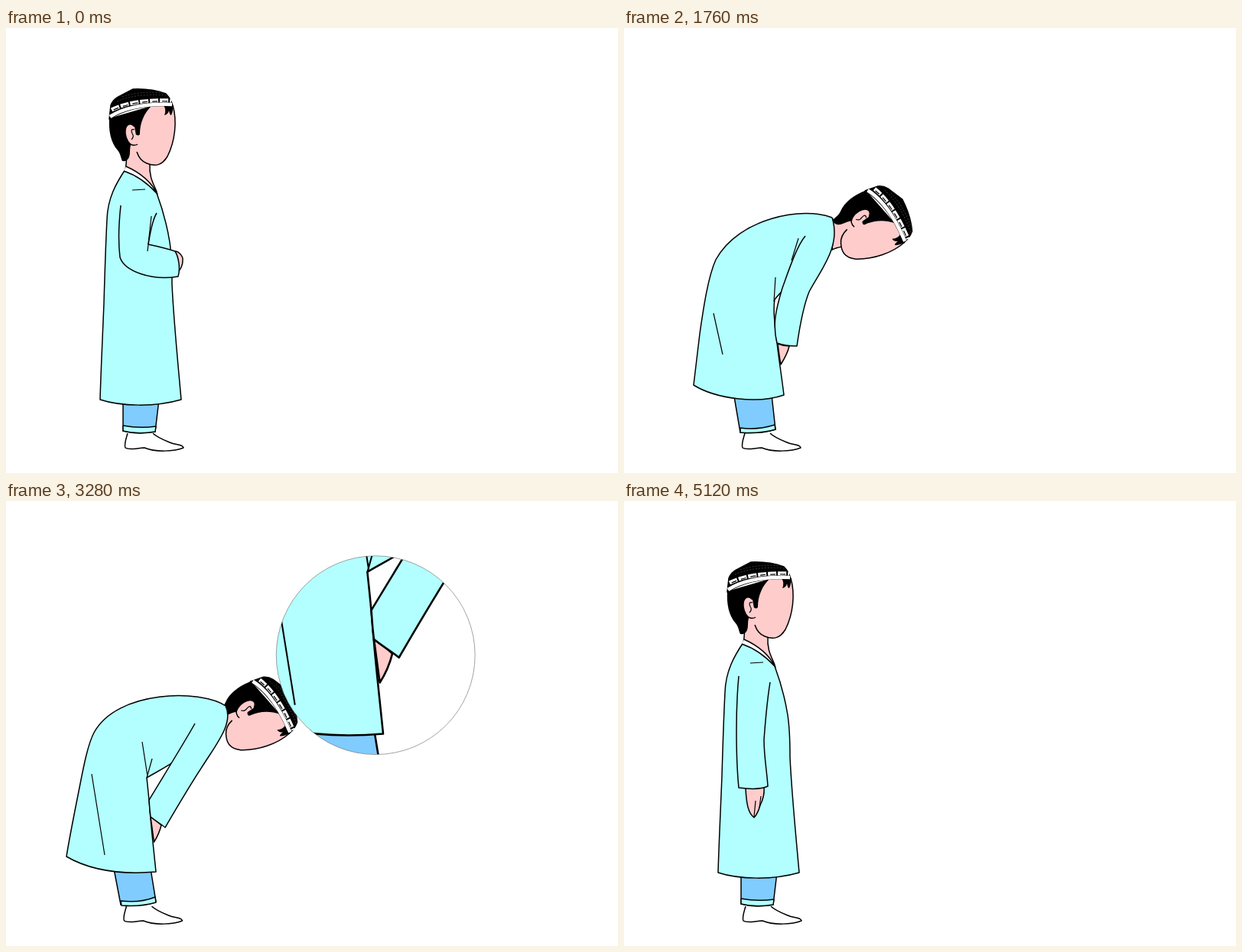
An HTML page for the animation above (5400 ms loop, 800 by 582 pixels).

```html
<!DOCTYPE html>
<html lang="en">
<head>
<meta charset="utf-8">
<title>Bowing boy</title>
<style>
  html, body { margin: 0; width: 100%; height: 100%; overflow: hidden; background: #fff; }
  svg { display: block; width: 100vw; height: 100vh; }
  .ink { stroke: #000; stroke-width: 1.5; stroke-linejoin: round; stroke-linecap: butt; }
  .thin { stroke: #000; stroke-width: 1.2; fill: none; }
  .cloth { fill: #b3ffff; }
  .skin { fill: #ffcccc; }
  .white { fill: #fff; }
  .line { fill: none; }
</style>
</head>
<body>
<svg viewBox="0 0 800 582">
  <defs><clipPath id="clip"><circle id="hole"/></clipPath></defs>
  <g id="fig">
    <path id="foot" class="ink white" d="M159,530C157,537 154,545 156,549C162,553 172,549 181,549C195,555 220,554 232,549C231,544 222,546 214,542C204,538 197,535 192,530"/>
    <path id="pants" class="ink" fill="#80ccff"/>
    <path id="cuff" class="ink cloth"/>
    <path id="neck" class="ink skin"/>
    <g id="head">
      <path class="skin" d="M188,103L218,101C224,122 221,148 211,168C203,181 194,181 184,177L160,171L160,150L165,122Z"/>
      <path class="ink line" d="M218,101C224,122 221,148 211,168C203,181 194,181 184,177C176,174 173,168 171,162"/>
      <path d="M135,118C134,135 137,150 146,160C150,165 150,170 152,174C158,175 162,171 162,162C162,156 163,152 165,148L169,139C172,141 175,141 175,138C175,125 180,112 190,102Z"/>
      <path d="M206,101Q210,107 207,114Q212,113 213,108Q214,114 216,114Q219,108 218,101Z"/>
      <path class="ink skin" d="M168,129C162,122 155,127 156,138C157,146 161,152 165,153Q169,154 172,152"/>
      <path class="thin" d="M168,133Q162,131 165,138Q168,142 164,146"/>
      <path class="ink" d="M135,119L137,101Q139,95 145,91L166,80Q190,79 209,86Q216,93 218,102Q168,99 135,119Z"/>
      <path class="line" stroke="#fff" stroke-width="4.5" d="M136,116Q164,98 217,100"/>
      <path class="line" stroke="#fff" stroke-width="5" stroke-dasharray="11 2" d="M138,107Q166,93 216,95"/>
      <path class="thin" stroke-dasharray="7 6" stroke-dashoffset="-2" d="M139,108Q166,94 216,96"/>
      <path class="line" stroke="#666" stroke-width=".6" stroke-dasharray="2 2" d="M145,96Q170,85 210,88M152,90Q175,82 204,85"/>
    </g>
    <path id="robe" class="ink cloth"/>
    <path id="collar" class="ink white"/>
    <path id="hand" class="ink skin"/>
    <path id="fingers" class="thin"/>
    <path id="sleeve" class="ink cloth"/>
    <path id="folds" class="thin"/>
  </g>
  <g id="lens">
    <circle id="glass" class="white"/>
    <g clip-path="url(#clip)"><use id="zoom" href="#fig"/></g>
    <circle id="rim" fill="none" stroke="#666" stroke-width=".6"/>
  </g>
</svg>
<script>
const LOOP = 5400;
const $ = id => document.getElementById(id);

// Every pose has the same path structure, so poses can be blended number by number.
const stand = {
  head: [163, 138], turn: 0, foot: 0,
  pants: 'M153,486L153,527Q172,532 195,528L200,486',
  cuff: 'M153,520L153,527Q172,532 195,528L196,521Q175,524 153,520',
  neck: 'M157,165C158,172 157,180 156,186L197,214C192,202 187,195 188,177',
  robe: 'M156,185C144,203 133,222 132,250C130,290 129,325 128,360C126,410 124,450 123,486C150,495 195,496 229,486C224,430 219,380 217,335C217,315 217,300 214,280C210,255 204,235 197,216C186,202 172,190 156,185',
  collar: 'M157,181C175,189 190,202 198,217C186,204 172,193 154,187',
  hand: 'M183,375C184,385 181,392 178,398C176,405 174,410 170,414C162,408 160,395 159,376',
  fingers: 'M170,413L172,392M177,401L179,386',
  sleeve: 'M150,229C148,250 147,280 147,300C147,330 148,355 150,375C165,377 180,377 188,373C187,355 183,335 183,312C185,285 188,255 191,237',
  folds: 'M165,212L182,211M125,400L125,400M217,335L217,335M183,312L183,312'
};
const folded = {
  ...stand,
  hand: 'M221,292C226,292 232,299 231,304C231,310 229,314 226,318C224,310 222,300 221,292',
  fingers: 'M226,300L226,300M226,305L226,305',
  sleeve: 'M150,232C148,250 146,275 149,300C155,318 190,331 225,325C228,315 226,300 221,292C215,290 205,287 186,283C188,270 192,250 197,242',
  folds: 'M165,212L182,211M125,400L125,400M217,335L217,335M185,292L190,246'
};
const lean = {
  head: [213, 151], turn: 15.5, foot: -.3,
  pants: 'M153,486L154,529Q175,533 196,529L198,486',
  cuff: 'M154,523L154,529Q175,533 196,529L196,523Q175,528 154,523',
  neck: 'M200,176C197,184 194,190 191,194L216,240C215,225 217,208 226,195',
  robe: 'M189,193C160,203 139,250 126,305C121,330 119,355 119,380C119,415 118,450 119,482C150,492 190,494 226,485C221,445 217,405 214,365C214,345 214,330 215,310C216,285 216,262 216,240C213,225 200,205 189,193',
  collar: 'M191,192C203,206 213,222 216,240C212,226 200,208 187,194',
  hand: 'M229,342C234,346 240,355 238,361C234,362 236,372 226,373C218,372 220,366 222,358',
  fingers: 'M233,349L232,363M227,360L224,370',
  sleeve: 'M169,234C165,255 163,275 166,298C168,325 195,345 214,364C220,358 229,350 231,340C232,330 215,315 198,294C199,280 204,262 208,248',
  folds: 'M172,212L172,212M119,400L119,400M215,310L215,310M200,292L198,294'
};
const bow = {
  head: [310, 246], turn: 65, foot: -1,
  pants: 'M144,482L152,529Q178,531 198,525L193,480',
  cuff: 'M152,523L152,529Q178,531 198,525L197,519Q175,526 152,523',
  neck: 'M285,250C280,252 276,252 272,250L272,290C276,288 280,287 285,286',
  robe: 'M272,248C235,233 150,248 120,303C110,325 104,365 99,400C96,425 93,450 91,467C120,485 175,492 209,480C206,455 202,430 200,412C198,395 194,370 197,355C204,346 230,320 270,290C274,280 275,262 272,248',
  collar: 'M272,250C274,262 274,278 272,288C274,278 274,262 272,250',
  hand: 'M201,413C206,415 212,416 216,416C214,425 210,432 205,440C203,430 202,421 201,413',
  fingers: 'M206,422L206,422M206,424L206,424',
  sleeve: 'M237,272C226,285 216,315 207,340C198,370 194,388 200,412C208,415 218,416 226,416C229,395 234,365 242,345C258,315 284,285 272,248',
  folds: 'M250,255L250,255M117,373L129,427M198,326L196,358M228,275L219,304'
};
const deep = {
  head: [314, 269.5], turn: 65, foot: -1.5,
  pants: 'M141,481L150,528Q176,531 196,524L189,481',
  cuff: 'M150,523L151,529Q176,531 196,525L195,518Q175,526 150,523',
  neck: 'M294,268C291,268 289,268 287,268L288,292C290,291 291,291 293,290',
  robe: 'M287,268C255,246 145,247 115,303C106,320 100,355 95,380C89,410 83,440 79,465C115,486 160,488 196,485C193,455 190,430 188,403C187,390 185.5,376 184,362C200,352 230,340 288,288C290,282 290,275 287,268',
  collar: 'M286,270C288,275 288,280 287,286C288,280 288,275 286,270',
  hand: 'M189,413C194,417 199,420 203,424C201,432 198,439 193.5,446C192,436 190.5,424 189,413',
  fingers: 'M195,428L195,428M195,430L195,430',
  sleeve: 'M247,291C233,316 202,366 187,391C187.5,398 188,406 189,413C195,418 202,422 208,427C222,403 240,372 258,345C275,318 298,290 287,268',
  folds: 'M260,262L260,262M112,357L129,463M178,315L185,360M191,337L184,362'
};
const rise = {
  head: [305, 238], turn: 63, foot: -1.5,
  pants: 'M144,482L151,528Q178,531 196,525L192,480',
  cuff: 'M151,523L151,529Q178,531 196,525L195,519Q175,526 151,523',
  neck: 'M285,245C279,246 273,246 268,245L268,284C272,282 278,280 283,279',
  robe: 'M268,243C242,234 135,243 112,325C104,350 99,380 96,410C94,430 93,450 92,469C120,485 175,492 205,484C202,455 199,430 197,403C196,390 194,375 193,362C205,340 230,310 266,285C270,275 271,258 268,243',
  collar: 'M268,246C270,258 269,272 267,283C269,272 270,258 268,246',
  hand: 'M197.5,403C202,405 206,407 210,407C209,420 207,435 202,443C200.5,430 199,416 197.5,403',
  fingers: 'M203,418L203,418M203,420L203,420',
  sleeve: 'M230,278C222,290 205,335 193,362C195,380 197,395 198,403C202,405 206,407 211,407C216,385 225,355 240,335C255,312 278,285 268,243',
  folds: 'M250,250L250,250M111,364L119,428M191,333L193,362M226,281L219,304'
};

const parts = ['pants', 'cuff', 'neck', 'robe', 'collar', 'hand', 'fingers', 'sleeve', 'folds'];
const mix = (a, b, u) => a + (b - a) * u;
const nums = s => s.match(/-?[\d.]+/g).map(Number);

// Upper points swing outward so the torso turns on an arc.
function blendPoints(a, b, u, arc) {
  const p = a.map((v, i) => mix(v, b[i], u));
  for (let i = 0; i < p.length; i += 2) p[i] += arc * Math.max(0, 310 - p[i + 1]);
  return p;
}

function drawPose(a, b, u, swing = 0) {
  const arc = swing * Math.sin(Math.PI * u);
  for (const id of parts) {
    const p = blendPoints(nums(a[id]), nums(b[id]), u, arc);
    let i = 0;
    $(id).setAttribute('d', a[id].replace(/-?[\d.]+/g, () => p[i++].toFixed(2)));
  }
  const [x, y] = blendPoints(a.head, b.head, u, arc);
  $('head').setAttribute('transform',
    `translate(${x} ${y}) rotate(${mix(a.turn, b.turn, u)}) translate(-163 -138)`);
  $('foot').setAttribute('transform', `translate(${mix(a.foot, b.foot, u)} 0)`);
}

const stepAt = (t, start, size) => Math.floor((t - start) / size) + 1;

function drawFigure(t) {
  if (t < 560) return drawPose(folded, folded, 0);
  if (t < 4160) {
    const s = Math.min(24, stepAt(t, 560, 80));
    if (s <= 4) return drawPose(folded, lean, s / 4);
    if (s <= 16) return drawPose(lean, bow, (s - 4) / 12, .1);
    return drawPose(bow, deep, (s - 16) / 8);
  }
  const s = Math.min(13, stepAt(t, 4160, 80));
  if (s <= 3) return drawPose(deep, rise, s / 3);
  drawPose(rise, stand, (s - 3) / 10, .2);
}

function drawLens(t) {
  const on = t >= 2600 && t < 4120;
  $('lens').setAttribute('display', on ? 'inline' : 'none');
  if (!on) return;
  const u = Math.min(1, stepAt(t, 2600, 40) / 25.5);
  const p = Math.sin(u * Math.PI / 2);
  const x0 = 190.3, y0 = 425.2, r0 = 75.5;
  const x = mix(x0, 517.5, p), y = mix(y0, 175.5, p), r = mix(r0, 136.3, p);
  for (const id of ['hole', 'glass', 'rim']) {
    $(id).setAttribute('cx', x);
    $(id).setAttribute('cy', y);
    $(id).setAttribute('r', r);
  }
  $('zoom').setAttribute('transform',
    `translate(${x} ${y}) scale(${r / r0}) translate(${-x0} ${-y0})`);
}

const began = performance.now();
function frame() {
  const t = (performance.now() - began) % LOOP;
  drawFigure(t);
  drawLens(t);
  requestAnimationFrame(frame);
}
frame();
</script>
</body>
</html>
```
